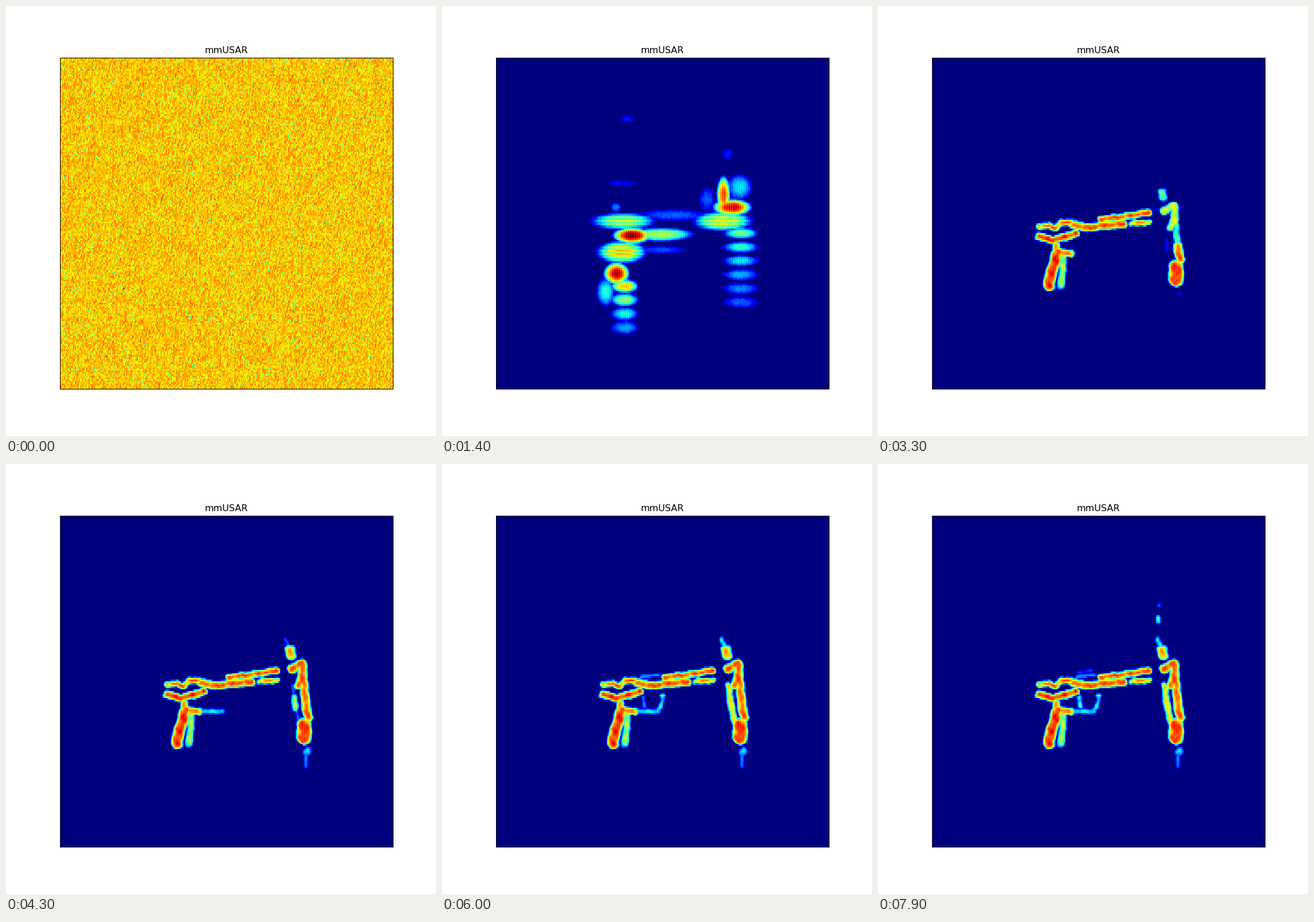
A matplotlib script for the animation above (8 s loop, 748 px wide and 748 px high).

```python
import numpy as np
import matplotlib.pyplot as plt
from matplotlib.animation import FuncAnimation

SIZE, DPI = 748, 96
FRAMES, STEP = 80, 100
COLS, ROWS = 400, 200
LEFT, RIGHT, TOP, BOTTOM = (SIZE * f for f in (0.125, 0.9, 0.12, 0.89))
FLOOR = -0.35
LOBE_GAP = 24
BLOB, ECHOES, SHARP = 6, 14, 24  # frames where each stage is complete

# cell centres in stage pixels, y downwards
X, Y = np.meshgrid(
    LEFT + (np.arange(COLS) + 0.5) * (RIGHT - LEFT) / COLS,
    TOP + (np.arange(ROWS) + 0.5) * (BOTTOM - TOP) / ROWS)
WAVE = (np.sin(X / 2.3 + np.sin(Y / 5)) * np.cos(Y / 2.9 + np.sin(X / 7))
        + np.sin(X / 5.1 - Y / 4.3))
STRIPES = np.cos(2 * np.pi * X / 3.9)
RIPPLE = 1 + 0.1 * np.cos(2 * np.pi * Y / 5.75)


def bar(level, width, *pts, soft=4.5):
    """Soft-edged stroke along a path; width is the half width."""
    d = np.full(X.shape, np.inf)
    for (x0, y0), (x1, y1) in zip(pts, pts[1:] or pts):
        dx, dy = x1 - x0, y1 - y0
        t = np.clip(((X - x0) * dx + (Y - y0) * dy)
                    / max(dx * dx + dy * dy, 1), 0, 1)
        d = np.minimum(d, np.hypot(X - x0 - t * dx, Y - y0 - t * dy))
    return level * np.tanh((width - d + 0.5 * WAVE) / soft)


def lobe(level, x, y, rx, ry):
    return level * (1 - np.hypot((X - x) / rx, (Y - y) / ry) ** 2.4)


def ladder(level, x, y, rx, ry, count, decay):
    """Side lobes of falling strength below one another."""
    return merge(lobe(level * decay ** k, x, y + LOBE_GAP * k, rx, ry)
                 for k in range(count))


def merge(fields):
    return np.maximum(np.max(list(fields), axis=0), FLOOR)


def glow():
    return merge([
        bar(0.98, 25, (490, 298), (505, 350), soft=17),
        lobe(0.55, 445, 373, 15, 20),
        lobe(0.62, 306, 470, 12, 32),
        lobe(0.38, 285, 385, 28, 26),
        lobe(0.44, 403, 392, 18, 15),
        lobe(0.55, 514, 461, 16, 13)])


def echoes():
    bands = merge([
        lobe(0.54, 315, 374, 60, 16), lobe(0.66, 312, 428, 46, 22),
        lobe(0.6, 488, 374, 55, 19)])
    return merge([
        bands * RIPPLE,
        lobe(1, 330, 399, 36, 15), lobe(0.56, 380, 397, 61, 13),
        lobe(0.22, 400, 364, 70, 11), lobe(0.2, 380, 424, 45, 7),
        lobe(0.96, 303, 465, 24, 21), lobe(0.4, 284, 497, 17, 27),
        ladder(0.7, 317, 487, 26, 13, 4, 0.74),
        lobe(0.93, 504, 350, 36, 16), lobe(0.82, 489, 328, 13, 35),
        lobe(0.35, 517, 315, 23, 24), lobe(0.22, 460, 337, 14, 22),
        ladder(0.48, 519, 395, 33, 11, 6, 0.85),
        lobe(0.25, 302, 350, 10, 9), lobe(0.15, 496, 257, 10, 10),
        lobe(0.14, 322, 196, 14, 7), lobe(0.13, 312, 308, 26, 5),
    ]) * (1 + 0.06 * STRIPES)


# each part with the frame at which it has grown to full strength
PARTS = [
    # pistol: slide, frame, lug, rear, grip
    (27, bar(0.88, 8, (388, 371), (430, 366), (470, 359))),
    (27, bar(0.86, 9, (340, 380), (362, 386), (395, 381), (426, 379))),
    (30, bar(0.82, 6.5, (440, 378), (471, 376))),
    (27, bar(0.9, 8.5, (279, 401), (304, 407), (343, 396))),
    (28, bar(0.86, 7, (280, 383), (297, 382), (307, 387),
             (318, 377), (336, 376))),
    (27, bar(0.8, 8, (310, 416), (308, 428), (336, 430))),
    (26, bar(0.88, 12, (311, 430), (307, 447), (299, 470), (297, 486))),
    (27, bar(0.58, 8, (322, 434), (321, 460), (317, 487))),
    # guard, trigger, sight
    (43, bar(0.42, 6, (340, 430), (376, 430))),
    (56, bar(0.42, 5.5, (372, 431), (380, 422), (384, 405))),
    (58, bar(0.55, 5, (381, 403), (385, 403))),
    (64, bar(0.5, 6, (349, 406), (352, 421))),
    (60, bar(0.36, 5, (346, 370), (375, 367))),
    (72, bar(0.25, 4, (348, 362), (371, 359))),
    # knife: blade, handle, tail
    (40, bar(0.72, 11, (494, 323), (495, 332))),
    (48, bar(0.5, 6, (485, 305), (492, 316))),
    (38, bar(0.84, 10, (497, 356), (514, 347), (516, 370), (509, 384))),
    (27, bar(0.82, 10, (521, 418), (525, 440))),
    (42, bar(0.82, 9.5, (517, 380), (521, 418))),
    (46, bar(0.7, 8, (501, 405), (502, 425))),
    (54, bar(0.72, 7.5, (498, 385), (501, 415), (509, 448))),
    (26, bar(0.85, 15, (518, 454), (518, 475))),
    (40, bar(0.42, 9, (523, 500))),
    (42, bar(0.32, 5, (521, 505), (521, 526))),
    # weak echoes over the blade
    (70, bar(0.46, 6, (487, 267), (487, 274))),
    (72, bar(0.26, 5.5, (488, 246))),
]
GHOST = bar(0.55, 9, (470, 356), (529, 350))


def objects(i):
    grown = [part - 0.04 * max(0, full - i) for full, part in PARTS]
    v = merge(grown + [GHOST - 0.05 * (i - SHARP)])
    return v + (0.03 * WAVE + 0.02 * STRIPES) * (v > 0.3)


EMPTY = np.full(X.shape, FLOOR)
GLOW, COARSE = glow(), echoes()


def scene(i):
    if i >= SHARP:
        return objects(i)
    stages = [(0, EMPTY), (BLOB, GLOW), (ECHOES, COARSE),
              (SHARP, objects(SHARP))]
    for (i0, a), (i1, b) in zip(stages, stages[1:]):
        if i < i1:
            return a + (b - a) * (i - i0) / (i1 - i0)


def speckle(rng, slanted):
    """Complex noise, smeared into slanted streaks or round grains."""
    n = rng.normal(size=X.shape) + 1j * rng.normal(size=X.shape)
    if slanted:
        n = sum(np.roll(n, (k, -(k // 2)), (0, 1)) for k in range(3))
    else:
        n = n + 0.9 * np.roll(n, 1, 1) + 0.5 * np.roll(n, 2, 1)
        n = n + 0.6 * np.roll(n, 1, 0)
    return n / np.sqrt(np.mean(abs(n) ** 2))


def field(i):
    v = scene(i)
    if i > 18:
        return v
    # log scale: the noise floor sinks while the contrast opens up
    rng = np.random.default_rng(100 + i)
    base = 0.72 - 0.055 * i - 0.0031 * i * i
    gain = 0.095 + 0.205 * min(1, i / BLOB)
    grain = 0.4 * np.clip((12 - i) / 6, 0, 1)
    signal = np.exp(v / gain) * (1 + grain * speckle(rng, False))
    noise = np.exp(base / gain) * speckle(rng, i < 4)
    return gain * np.log(abs(signal + noise) + 1e-9)


fig, ax = plt.subplots(figsize=(SIZE / DPI, SIZE / DPI), dpi=DPI)
ax.set_title("mmUSAR")
ax.set_xticks([])
ax.set_yticks([])
image = ax.imshow(field(0), cmap="jet", vmin=0, vmax=1, aspect="auto",
                  interpolation="nearest",
                  extent=(LEFT, RIGHT, BOTTOM, TOP))


def update(i):
    image.set_data(field(i))
    return [image]


anim = FuncAnimation(fig, update, frames=FRAMES, interval=STEP,
                     repeat=True, repeat_delay=0, blit=False)
plt.show()
```
